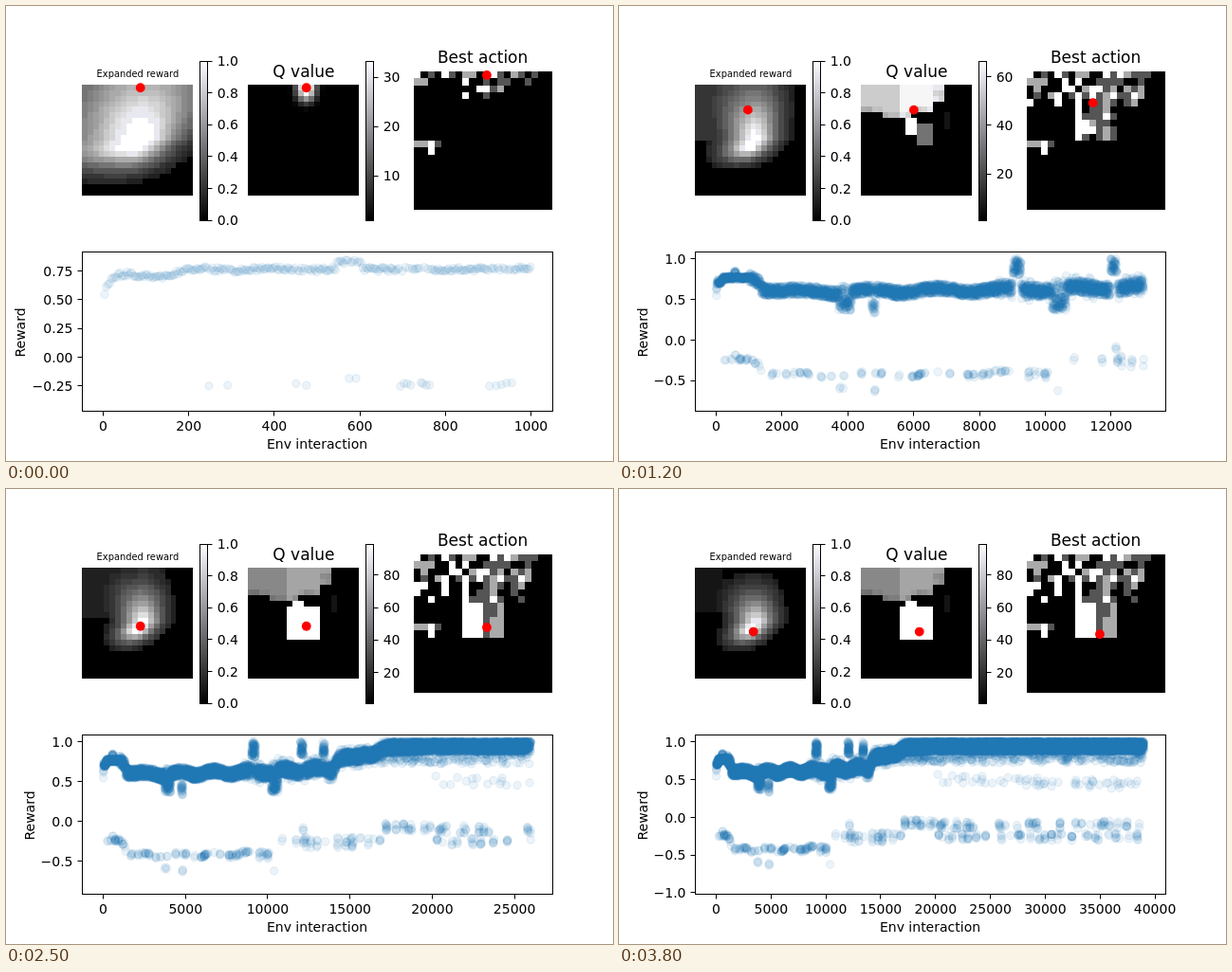
Recreate the animation shown at these times as an HTML page with a canvas. Size 640 px wide and 480 px high, loop 3900 ms.

```html
<!DOCTYPE html>
<html lang="en">
<head>
<meta charset="utf-8">
<title>Training progress</title>
<style>
html, body { margin: 0; width: 100%; height: 100%; overflow: hidden; background: #fff; }
canvas { display: block; width: 640px; height: 480px; }
</style>
</head>
<body>
<canvas id="stage" width="640" height="480"></canvas>
<script>
const ctx = document.getElementById('stage').getContext('2d');
const FRAMES = 39, FRAME_MS = 100, CELLS = 20;
const BOX = { x: 80, y: 259, w: 496, h: 168 };
const BLUE = '#1f77b4';

// Key points: [position, value, ...]
const MEAN = [[0, .68], [250, .765], [1000, .77], [1320, .73], [1380, .64], [2500, .59],
  [8900, .62], [14000, .66], [14300, .79], [16500, .84], [17200, .93], [20000, .95]];
const AGENT = [[0, 10, 0], [5, 12, 0], [12, 9, 4], [17, 9, 10], [25, 10, 10], [32, 10, 9], [38, 10, 11]];
const Q_MAX = [[0, 33.3], [5, 54.1], [12, 66.4], [17, 88], [25, 99.2]];
// Stretches where the reward leaves its trend: from, to, level
const EVENTS = [[545, 605, .83], [3720, 4120, .45], [4720, 4860, .42], [9010, 9270, .9],
  [10200, 10650, .45], [11980, 12180, .91], [13330, 13480, .91]];

// Seeded random number in 0..1
function hash(a, b) {
  let h = Math.imul(a + 1, 374761393) + Math.imul(b + 1, 668265263);
  h = Math.imul(h ^ h >>> 13, 1274126177);
  h = Math.imul(h ^ h >>> 16, 2246822519);
  return ((h ^ h >>> 15) >>> 0) / 2 ** 32;
}

const clamp = (v, lo, hi) => Math.max(lo, Math.min(hi, v));

function at(keys, x, column = 1) {
  let i = 0;
  while (i + 2 < keys.length && keys[i + 1][0] < x) i++;
  const a = keys[i], b = keys[i + 1];
  return a[column] + (b[column] - a[column]) * clamp((x - a[0]) / (b[0] - a[0]), 0, 1);
}

function gray(v) {
  if (v > .88 && v < .96) return 'rgb(232,232,240)';
  const g = Math.round(clamp(v, 0, 1) * 255);
  return `rgb(${g},${g},${g})`;
}

function text(str, x, y, size = 14, align = 'center') {
  ctx.font = `${size}px "DejaVu Sans", sans-serif`;
  ctx.textAlign = align;
  ctx.fillStyle = '#000';
  ctx.fillText(str, x, y);
}

function line(x0, y0, x1, y1) {
  ctx.beginPath();
  ctx.moveTo(x0, y0);
  ctx.lineTo(x1, y1);
  ctx.stroke();
}

const snap = v => Math.floor(v) + .5;
const label = (v, digits) => (Math.abs(v) < 1e-9 ? 0 : v).toFixed(digits).replace('-', '\u2212');

// Smallest round step that splits the range into at most `bins` parts
function niceStep(range, bins) {
  const raw = range / bins, base = 10 ** Math.floor(Math.log10(raw));
  return [1, 2, 2.5, 5, 10].find(m => m * base >= raw) * base;
}

function grid(x, y, size, k, value) {
  const s = size / CELLS, edge = n => Math.round(n * s);
  ctx.fillStyle = '#000';
  ctx.fillRect(x, y, size, size);
  for (let r = 0; r < CELLS; r++) {
    for (let c = 0; c < CELLS; c++) {
      const v = value(r, c);
      if (v <= 0) continue;
      ctx.fillStyle = gray(v);
      ctx.fillRect(x + edge(c), y + edge(r), edge(c + 1) - edge(c), edge(r + 1) - edge(r));
    }
  }
  const col = Math.round(at(AGENT, k)), row = Math.round(at(AGENT, k, 2));
  ctx.fillStyle = '#f00';
  ctx.beginPath();
  ctx.arc(x + (col + .5) * s + .3, y + (row + .5) * s + .3, 4.9, 0, 7);
  ctx.fill();
}

// A lopsided glow that shrinks over time, with a dim corner at top left
function rewardMap(k) {
  const fade = Math.exp(-k / 12), fast = fade * fade;
  const left = 2.8 + 10 * fast, right = 2.9 + 2.7 * fast;
  const up = 5 + 13 * fade, down = 2.1 + 1.6 * fast;
  return (r, c) => {
    const dy = r - 10.6, high = Math.max(0, -dy);
    const dx = c - 10.5 + Math.max(0, r - 9) * .6;
    const sx = dx < 0 ? left * (1 + .1 * (1 - fade) * high) : right * (1 + (.02 + .1 * fast) * high);
    const d = Math.hypot(dx / sx, dy / (dy < 0 ? up : down));
    let v = 1.2 * Math.exp(-(d ** 1.3));
    if (v < .12) v = 0;
    if (c < 5 && r < 10 - k / 15) v = Math.max(v, .07 + .4 * fade);
    return Math.round(v * 24) / 24;
  };
}

function valueMap(k, max) {
  const grown = Math.min(1, .75 + k / 25);
  return (r, c) => {
    if (k < 3) return 1.25 * Math.exp(-(((c - 10) / 1.8) ** 2) - (r / 2.5) ** 2) - .06;
    const depth = (5 + 1.9 * hash(c, 9) - 1.5 * Math.max(0, c - 12)) * grown;
    if (c < 15 && r < Math.floor(depth)) {
      const edge = r + 2 > depth || c > 12 ? .82 + .18 * hash(r, c) : 1;
      return Math.min(1, (c < 7 ? 53 : Math.min(64, 45 + k * 2)) / max) * edge;
    }
    if (c === 15 && r > 4 && r < 8) return .08;
    if (k < 8) return 0;
    if (r === 6 && (c === 8 || c === 9)) return 1;
    const inside = c > 6 && c < 13 && r > 6 && r < 13;
    if (!inside) return 0;
    if (k > 14) return 1;
    return r > k - 2 ? 0 : c > 9 ? .45 : c > 7 && r < 9 ? 1 : 0;
  };
}

function actionMap(k) {
  const seen = Math.min(1, .28 + .045 * k);
  return (r, c) => {
    const core = c > 6 && c < 13;
    const pick = hash(r + 17, c + 23);
    const strip = r === 10 && c < 4 || r === 11 && c === 2;
    if (strip) return c === 3 ? 1 / 3 : c === 2 ? 1 : 2 / 3;
    const depth = c > 17 ? 0 : core ? 11 + hash(c, 4) : 3 + 4 * hash(c, 6) - Math.max(0, c - 15);
    if (r >= depth * seen) return 0;
    if (core && r > 6 && hash(r, c + 50) < (k - 8) / 12) {
      return c < 10 ? 1 : r > 8 && c > 10 || c > 11 ? 2 / 3 : 1 / 3;
    }
    if (hash(r + 2, c + 11) < (k < 4 ? .5 : core ? .15 : .35)) return 0;
    const white = c < 8 ? .5 : .2;
    return pick < white ? 1 : pick < white + .3 ? 2 / 3 : 1 / 3;
  };
}

function colorbar(x, lo, hi, step, digits) {
  const top = 58, h = 168;
  const fill = ctx.createLinearGradient(0, top + h, 0, top);
  fill.addColorStop(0, '#000');
  fill.addColorStop(.92, '#e8e8f0');
  fill.addColorStop(1, '#fff');
  ctx.fillStyle = fill;
  ctx.fillRect(x, top, 9, h);
  ctx.strokeRect(x + .5, top + .5, 8, h);
  for (let v = Math.ceil(lo / step) * step; v <= hi + 1e-6; v += step) {
    const y = top + h * (hi - v) / (hi - lo);
    line(x + 9, snap(y), x + 13.5, snap(y));
    text(label(v, digits), x + 18.7, y + 5.2, 14, 'left');
  }
}

function trend(t) {
  const wave = t < 1000 ? .035 * Math.sin(t / 28) * Math.exp(-t / 300)
    : t < 14000 ? .025 * Math.sin(t / 330) : 0;
  return at(MEAN, t) + wave - .16 * Math.exp(-t / 12);
}

// Rewards follow the trend; clusters of failed episodes fall into a low band
function reward(t) {
  const [kind, n, luck] = [1, 2, 3].map(i => hash(t, i));
  const noise = n * 2 - 1;
  const event = EVENTS.find(([from, to]) => t > from && t < to);
  const level = event && (event[2] > .6 || luck < .7) ? event[2] : trend(t);
  const early = t < 1350;
  const cluster = hash(Math.floor(t / 60), 5);

  if (t > 30 && cluster < (early ? .5 : .22) && kind < (early ? .25 : .2)) {
    if (t > 20000) return (cluster < .12 ? -.1 : -.26) + noise * .05;
    if (t > 10700 && level < .9) return -.27 + noise * .07;
    return 1.1 * Math.min(level, .92) - 1.09 + noise * (t < 9000 ? .02 : .05);
  }
  if (t > 20000 && kind > .985) return .62 - t / 200000 + noise * .06;
  if (t > 15000 && kind > .9) return .82 + noise * .1;
  const spread = t < 1000 ? .018 : event ? .09 : t < 8500 ? .06 : .075;
  const tail = t > 8500 && luck > .9 ? 1.7 : 1;
  return Math.min(1, level + noise * spread * tail);
}

const points = [];
for (let t = 3; t < FRAMES * 1000; t += 4) points.push([t, reward(t)]);

function yRange(n) {
  const hi = n < 9000 ? .857 : 1;
  const lo = n < 4000 ? -.36 - n / 21000
    : -.787 - .133 * (Math.max(0, n - 19000) / 20000) ** 1.2;
  const pad = (hi - lo) * .05;
  return [lo - pad, hi + pad];
}

function scatter(n) {
  const { x, y, w, h } = BOX;
  const [lo, hi] = yRange(n);
  const px = t => x + w * (t / n + .05) / 1.1;
  const py = v => y + .2 + h * (hi - v) / (hi - lo);

  ctx.save();
  ctx.beginPath();
  ctx.rect(x, y, w, h);
  ctx.clip();
  ctx.globalAlpha = .08;
  ctx.fillStyle = ctx.strokeStyle = BLUE;
  ctx.lineWidth = 1.39;
  for (const [t, v] of points) {
    if (t > n) break;
    ctx.beginPath();
    ctx.arc(px(t), py(v), 4.17, 0, 7);
    ctx.fill();
    ctx.stroke();
  }
  // Stacked layers round too dark, so cap them at the pure colour
  ctx.globalAlpha = 1;
  ctx.globalCompositeOperation = 'lighten';
  ctx.fillRect(x, y, w, h);
  ctx.restore();

  ctx.strokeRect(x + .5, y + .5, w, h);
  const xs = niceStep(n * 1.1, 9);
  for (let t = 0; t <= n * 1.05; t += xs) {
    line(snap(px(t)), y + h + 1, snap(px(t)), y + h + 5.5);
    text(String(t), px(t), 447.8);
  }
  const fine = hi - lo <= 1.5, ys = fine ? .25 : .5;
  for (let v = Math.ceil(lo / ys) * ys; v <= hi; v += ys) {
    line(x - 4.5, snap(py(v)), x, snap(py(v)));
    text(label(v, fine ? 2 : 1), x - 9.5, py(v) + 5.2, 14, 'right');
  }
  text('Env interaction', 328, 467);
  ctx.save();
  ctx.translate(fine ? 20 : 29.5, 344.5);
  ctx.rotate(-Math.PI / 2);
  text('Reward', 0, 0);
  ctx.restore();
}

function draw(k) {
  ctx.fillStyle = '#fff';
  ctx.fillRect(0, 0, 640, 480);
  ctx.strokeStyle = '#000';
  ctx.lineWidth = 1;
  const max = at(Q_MAX, k);
  text('Expanded reward', 138.9, 75, 9.9);
  text('Q value', 313.9, 75, 17);
  text('Best action', 502.6, 60, 17);
  grid(80, 83, 117, k, rewardMap(k));
  grid(255, 83, 117, k, valueMap(k, max));
  grid(430, 69, 146, k, actionMap(k));
  colorbar(204, 0, 1, .2, 1);
  colorbar(379, 1, max, max < 60 ? 10 : 20, 0);
  scatter((k + 1) * 1000);
}

let shown = -1;
const start = performance.now();
function tick() {
  const k = Math.floor((performance.now() - start) / FRAME_MS) % FRAMES;
  if (k !== shown) draw(shown = k);
  requestAnimationFrame(tick);
}
tick();
</script>
</body>
</html>
```
